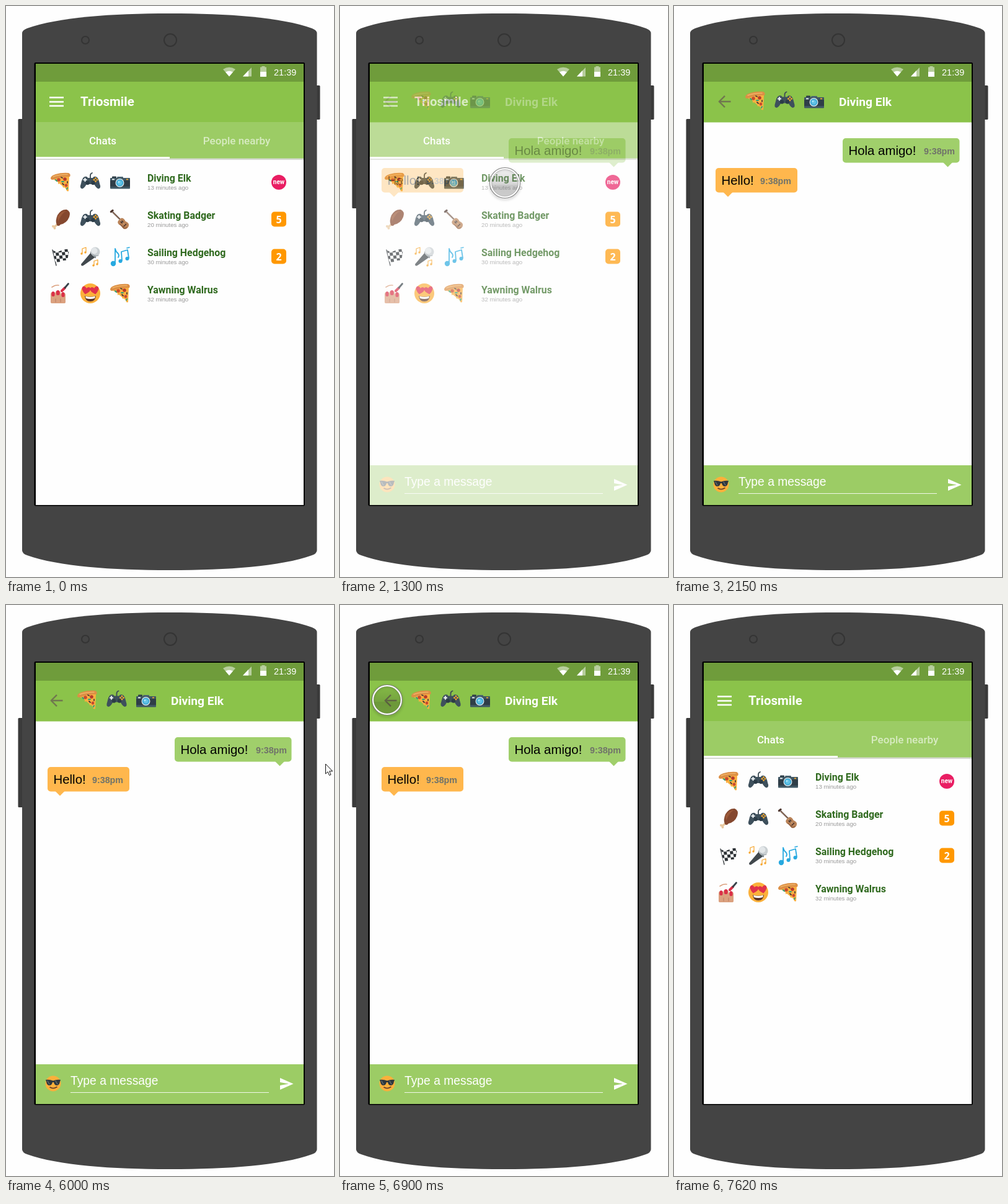
Animation of 529x920 px, one loop 8000 ms. Source, as an HTML page with a canvas:

```html
<!DOCTYPE html>
<html lang="en">
<head>
<meta charset="utf-8">
<title>Emoji chat</title>
<style>
html, body { margin: 0; width: 100%; height: 100%; overflow: hidden; background: #fefefe; }
canvas { display: block; width: 529px; height: 920px; }
</style>
</head>
<body>
<canvas id="stage" width="529" height="920"></canvas>
<script>
const W = 529, H = 920, LOOP = 8000;
const stage = document.getElementById('stage').getContext('2d');
let g = stage;

const SANS = '"Liberation Sans", Arial, sans-serif';
const ROBOTO = 'Roboto, sans-serif';
const WHITE = '#fefefe';

// Drawing helpers
function rect(x, y, w, h, fill) { g.fillStyle = fill; g.fillRect(x, y, w, h); }

function box(x, y, w, h, r, fill) {
  g.beginPath(); g.roundRect(x, y, w, h, r);
  g.fillStyle = fill; g.fill();
}

function disc(x, y, r, fill) {
  g.beginPath(); g.arc(x, y, r, 0, 7);
  g.fillStyle = fill; g.fill();
}

function ring(x, y, r, color, width) {
  g.beginPath(); g.arc(x, y, r, 0, 7);
  g.strokeStyle = color; g.lineWidth = width; g.stroke();
}

function shape(d, fill) { g.fillStyle = fill; g.fill(new Path2D(d)); }

function line(d, color, width, cap = 'round') {
  g.strokeStyle = color; g.lineWidth = width; g.lineCap = cap; g.lineJoin = 'round';
  g.stroke(new Path2D(d));
}

function text(s, x, y, font, fill, align = 'left') {
  g.font = font; g.fillStyle = fill; g.textAlign = align;
  g.fillText(s, x, y);
}

function at(x, y, draw, angle = 0, scale = 1) {
  g.save();
  g.translate(x, y); g.rotate(angle); g.scale(scale, scale);
  draw();
  g.restore();
}

// Pictograms, each about 32 units wide around the origin
function pizza() {
  shape('M-14 -6Q0 -11 14 -10L13 14Q10 16 9 11L6 8Q4 10 3 6L-2 2L-4 3V0Z', '#fbb040');
  shape('M-16 -7Q-15 -11 -8 -13Q2 -16 13 -15Q17 -13 15 -9Q0 -9 -13 -4Q-16 -4 -16 -7Z', '#dc8f45');
  line('M-12 -9Q-2 -13 11 -12.500', '#f0b468', 1.5);
  disc(-3, -4, 2.8, '#c8492f');
  disc(7, -5, 2.8, '#b73a2b');
  disc(9, 5, 2.4, '#c8492f');
  line('M1 -8L3 -7M3 2L5 4M11 -1V1', '#4a3b38', 1.8);
  line('M-8 -4L-6 -2M2 -1L5 -1M11 9L10 11', '#27a17c', 1.8);
}

function gamepad() {
  line('M0 -6V-11Q0 -14 3 -15', '#3e4c55', 1.8);
  shape('M-9 -9Q-5 -10 -4 -7H4Q5 -10 9 -9Q13 -8 15 2Q18 10 13 10.500Q10 10 6 3H-6Q-10 10 -13 10.500Q-18 10 -15 2Q-13 -8 -9 -9Z', '#3e505c');
  disc(-4.5, 1, 3.2, '#2c3c47');
  disc(4.5, 1, 3.2, '#2c3c47');
  line('M-8.500 -7V-1M-11.500 -4H-5.500', '#e8edf0', 2.2, 'butt');
  disc(8.5, -6.5, 1.4, '#f6a52c');
  disc(11, -4, 1.4, '#f6a52c');
  disc(6, -4, 1.4, '#f6a52c');
  disc(8.5, -1.5, 1.4, '#f6a52c');
}

function camera() {
  box(-13, -9.5, 7, 4, 1, '#2f3e48');
  box(-5, -9, 10, 5, 1, '#4b6471');
  box(-16, -7, 32, 17.5, 1, '#3f5663');
  rect(-16, -3, 32, 10, '#2f3e48');
  rect(-13, -5.5, 4, 1.8, '#f0f3f4');
  rect(10, -5.5, 3, 1.8, '#f6a52c');
  disc(-0.5, 1, 7, '#dce4e8');
  disc(-0.5, 1, 5.8, '#42add8');
  disc(-0.5, 1, 3.6, '#63c3e6');
  disc(-2, -0.5, 1.6, '#a9e2f5');
}

function drumstick() {
  line('M-3 6L-10 12', '#e9c9a0', 3.6);
  disc(-12, 11, 2, '#e9c9a0');
  disc(-9.5, 14, 2, '#e9c9a0');
  shape('M-6 9Q-9 2 -5 -7Q1 -17 10 -16Q17 -13 14 -4Q10 6 0 8Q-3 12 -6 9Z', '#85482f');
  shape('M-5 -4Q1 -14 9 -14Q2 -10 -4 3Z', '#9a5838');
}

function guitar() {
  line('M-12 -12L3 3', '#5b3d31', 2.4, 'butt');
  line('M-14.500 -12.500L-12 -14.500', '#4b342c', 3.4);
  shape('M-1 0Q3 -5 7 0Q8 3 11 4Q17 8 12 13.500Q7 18 3 12Q1 9 -2 8Q-6 4 -1 0Z', '#b98257');
  line('M0 8Q3 10 4 12Q7 16 11 13', '#8b5a3c', 1.4);
  disc(3, 4, 2.3, '#4b342c');
  line('M-11 -11L7 8', '#d3bda0', 0.7);
  line('M6 11L9.500 7.500', '#4b342c', 1.6);
}

function flag() {
  const cloth = 'M-12 -10Q-5 -7 1 -10T14 -12L11 6Q5 5 0 8T-9 7Z';
  line('M-13 -11L-7 14', '#3e4347', 1.4);
  shape(cloth, WHITE);
  g.save();
  g.clip(new Path2D(cloth));
  g.transform(1, -0.08, 0.15, 1, 0, 0);
  for (let r = 0; r < 4; r++)
    for (let c = 0; c < 6; c++)
      if ((r + c) % 2 === 0) rect(-12 + c * 5, -12 + r * 5, 5, 5, '#2d3236');
  g.restore();
}

function mic() {
  shape('M2 -8L9 0L-11 14Q-15 16 -15 12Z', '#41484d');
  line('M1 -7L8 1', '#798389', 2.5);
  disc(8, -8, 7.5, '#c9cfd2');
  disc(6.5, -9.5, 5, '#e3e7e9');
  line('M3 -4Q7 0 13 -2', '#9ba4a9', 1.2);
  line('M-13 -6V-13L-7 -15V-8M6 14V7L12 5V11', '#f6a52c', 1.2);
  for (const [x, y] of [[-14, -5], [-8, -7], [5, 14], [11, 12]]) disc(x, y, 1.7, '#f6a52c');
}

function notes() {
  line('M-8 10V-13Q-7 -8 -3 -5Q-1 -2 -3 1', '#27a9e0', 1.8);
  disc(-11, 11, 4.2, '#27a9e0');
  line('M3 6L2 -8L12 -11L14 2', '#27a9e0', 1.8);
  disc(0.5, 7, 3, '#27a9e0');
  disc(11.5, 3, 3, '#27a9e0');
  line('M11 -14L15 -15', '#27a9e0', 1.6);
}

function nails() {
  for (const [x, y, w] of [[-16, -2, 8], [-8.5, -4, 8.5], [0, -1, 8]]) {
    box(x, y, w, 20 - (y + 4), 3.5, '#dba17f');
    box(x + 1.5, y - 1, w - 3, 8, 2.5, '#da2f47');
  }
  box(-16, 8, 24, 8, 2, '#dba17f');
  line('M-8 9V14M0 9V14', '#b97d60', 1);
  line('M2 -4L7 -9', '#da2f47', 4);
  line('M7 -9L12.500 -15.500', '#38434a', 2.8);
  line('M-14 -10Q-8 -14 -3 -13', '#dba17f', 1.6);
}

function heart() {
  shape('M0 6Q-8 0 -6 -4Q-3 -7 0 -3Q3 -7 6 -4Q8 0 0 6Z', '#e0324b');
}

function heartEyes() {
  disc(0, 0, 16, '#fbb03b');
  at(-7, -5, heart, 0.2, 1.1);
  at(7, -5, heart, -0.2, 1.1);
  shape('M-9 4Q0 7 9 4Q8 13 0 13T-9 4Z', '#5a3425');
  shape('M-8 4.500Q0 7 8 4.500L7 8Q0 10 -7 8Z', '#fff');
}

function coolFace() {
  disc(0, 0, 12.5, '#fbb03b');
  shape('M-12 -6Q-6 -7 0 -4.500Q6 -7 12 -6L11 -3Q10 3 6 3Q2 3 1 -2H-1Q-2 3 -6 3Q-10 3 -11 -3Z', '#30383d');
  line('M-9 -4L-6 1M4 -4L7 1', '#68747b', 1.2);
  line('M-5 6Q0 9.500 6 5.500', '#69402b', 1.6);
}

function phone() {
  rect(0, 0, W, H, WHITE);
  box(19.5, 182, 10, 144, 1.5, '#3a3a3a');
  box(496, 128, 10.5, 55, 1.5, '#3a3a3a');
  shape('M26 44Q26 39 34 36C85 18 170 12 264 12S443 18 493.500 36Q501.500 39 501.500 44V877Q501.500 882 493.500 885C443 903 358 909 264 909S85 903 34 885Q26 882 26 877Z', '#444');
  ring(128, 55, 6, '#343434', 2);
  ring(265, 55, 10, '#343434', 2);
  box(45.5, 91, 436.5, 714.5, 2, '#000');
  rect(48, 93, 432, 711, WHITE);
}

function statusBar() {
  rect(48, 93, 432, 29, '#6f9c3b');
  rect(48, 122, 432, 65.5, '#8bc34a');
  const dim = 'rgba(255,255,255,.5)';
  shape('M350 102Q360 95.500 370 102L360 113.500Z', dim);
  shape('M354 106.500Q360 103 366 106.500L360 113.500Z', '#fff');
  shape('M382 113.500L396 99V113.500Z', dim);
  shape('M382 113.500L391 104V113.500Z', '#fff');
  shape('M410 98.500H412.500V97H417.500V98.500H420V106H410Z', dim);
  rect(410, 106, 10, 8, '#fff');
  text('21:39', 432, 112, '14.5px ' + SANS, '#fff');
}

const chats = [
  ['Diving Elk', 13, [pizza, gamepad, camera]],
  ['Skating Badger', 20, [drumstick, gamepad, guitar], 5],
  ['Sailing Hedgehog', 30, [flag, mic, notes], 2],
  ['Yawning Walrus', 32, [nails, heartEyes, pizza]]
];

function listScreen(hover) {
  statusBar();
  for (const y of [147.5, 154.5, 161]) rect(70, y - 1.3, 23, 2.5, '#fff');
  text('Triosmile', 120, 161, '700 20.5px ' + ROBOTO, '#fff');
  rect(48, 187, 432, 59, '#9ccc65');
  rect(48, 245.5, 432, 2.5, '#d6d9d2');
  rect(48, 243, hover ? 432 : 216, 3, '#fff');
  const tab = '500 17px ' + ROBOTO;
  text('Chats', 156, 223, tab, '#fff', 'center');
  text('People nearby', 372, 223, tab, hover ? '#fff' : 'rgba(255,255,255,.6)', 'center');

  chats.forEach(([name, age, icons, count], i) => {
    const y = 284 + i * 60;
    icons.forEach((icon, k) => at(88 + k * 48, y - (i === 3 ? 1 : 0), icon));
    text(name, 228, y - 1, '700 15.9px ' + ROBOTO, '#2f691e');
    text(age + ' minutes ago', 228, y + 12, '9.7px ' + SANS, '#999');
    if (i === 0) {
      disc(440, y, 12, '#e91e63');
      text('new', 440, y + 3, '700 10px ' + ROBOTO, '#fff', 'center');
    }
    if (count) {
      box(428, y - 12.5, 24, 24, 5, '#ff9800');
      text(count, 440, y + 5.5, '700 16px "Noto Sans", sans-serif', '#fff', 'center');
    }
  });
}

function bubble(x, y, w, tail, color, message, timeX) {
  box(x, y, w, 39.5, 5, color);
  shape(`M${tail - 7.5} ${y + 39}h15l-7.500 7.500z`, color);
  text(message, x + 9.5, y + 26.5, '20.4px ' + SANS, '#000');
  text('9:38pm', timeX, y + 25.5, '700 14.3px ' + SANS, '#70736a');
}

function chatScreen() {
  rect(48, 93, 432, 711, WHITE);
  statusBar();
  line('M91.500 154H73M82 144.800L72.800 154L82 163.200', '#70774f', 2.4, 'butt');
  at(131, 153, pizza);
  at(178.5, 153.5, gamepad);
  at(226, 154, camera);
  text(chats[0][0], 266, 161, '700 19.2px ' + ROBOTO, '#fff');
  bubble(272, 213, 188.5, 441.5, '#a0cf6b', 'Hola amigo!', 403);
  bubble(67, 261, 132, 87, '#ffb74d', 'Hello!', 139);
  rect(48, 740, 432, 64, '#9ccc65');
  at(76, 771, coolFace);
  text('Type a message', 104, 773, '19.3px ' + SANS, '#fff');
  rect(104, 785, 320, 1, 'rgba(255,255,255,.85)');
  shape('M442 762L463.500 771.500L442 781V774L456 771.500L442 769Z', '#fff');
}

function touch(x, y, alpha = 1) {
  g.save();
  g.globalAlpha = alpha;
  g.translate(x, y);
  g.shadowColor = 'rgba(0,0,0,.4)';
  g.shadowBlur = 4;
  g.shadowOffsetY = 2;
  ring(0, 0, 24.2, 'rgba(120,120,120,.9)', 1.6);
  g.shadowColor = 'transparent';
  const shade = g.createLinearGradient(0, -22, 0, 22);
  shade.addColorStop(0, 'rgba(0,0,0,.05)');
  shade.addColorStop(0.56, 'rgba(0,0,0,.16)');
  shade.addColorStop(0.57, 'rgba(0,0,0,.22)');
  shade.addColorStop(1, 'rgba(0,0,0,.2)');
  disc(0, 0, 22.5, shade);
  ring(0, 0, 22.8, '#fff', 2.2);
  ring(0, 0, 21.5, 'rgba(90,90,90,.3)', 0.8);
  g.restore();
}

function arrowCursor(x, y) {
  const d = 'M.5 .5V16L4 12.700L6.500 18.500L9 17.400L6.600 11.800H11.300Z';
  at(x, y, () => { shape(d, '#fff'); line(d, '#111', 1); });
}

// Timing
const easeOut = (p, n) => 1 - (1 - p) ** n;
const mix = (a, b, p) => a + (b - a) * p;

function progress(t, start, end, tick) {
  const held = Math.floor((t - start) / tick) * tick;
  return Math.min(1, held / (end - start));
}

function chatOpacity(t) {
  if (t < 1300 || t >= 7200) return 0;
  if (t < 1440) return t < 1370 ? 0.33 : 0.67;
  if (t >= 7050) return 0.75 - 0.25 * Math.floor((t - 7050) / 50);
  return 1;
}

function pointer(t) {
  if (t >= 500 && t < 1880) {
    const p = progress(t, 500, 900, 30);
    const y = t < 1300 ? mix(420, 275, easeOut(p, 3.45)) : 285;
    touch(mix(468, 266, easeOut(p, 2.7)), y);
  } else if (t >= 1880 && t < 2150) {
    const p = (Math.floor((t - 1880) / 45) + 1) / 6;
    touch(mix(266, 474, p ** 1.8), mix(285, 323, p ** 1.8));
  } else if (t >= 6000 && t < 7200) {
    const p = easeOut(progress(t, 6000, 6660, 60), 2.5);
    const x = mix(515, 76, p), y = mix(256, 153, p);
    if (x > 500) arrowCursor(x, y);
    else touch(x, y, chatOpacity(t));
    if (t >= 6820 && t < 6900) disc(77.5, 156.5, 10, 'rgba(0,0,0,.08)');
  }
}

function layer(draw) {
  const c = document.createElement('canvas');
  c.width = W; c.height = H;
  g = c.getContext('2d');
  draw();
  g = stage;
  return c;
}

const chatLayer = layer(chatScreen);

function frame(now) {
  const t = now % LOOP;
  phone();
  listScreen(t >= 7410 && t < 7620);
  g.globalAlpha = chatOpacity(t);
  g.drawImage(chatLayer, 0, 0);
  g.globalAlpha = 1;
  pointer(t);
}

const begin = performance.now();
function tick() {
  frame(performance.now() - begin);
  requestAnimationFrame(tick);
}
tick();
</script>
</body>
</html>
```
